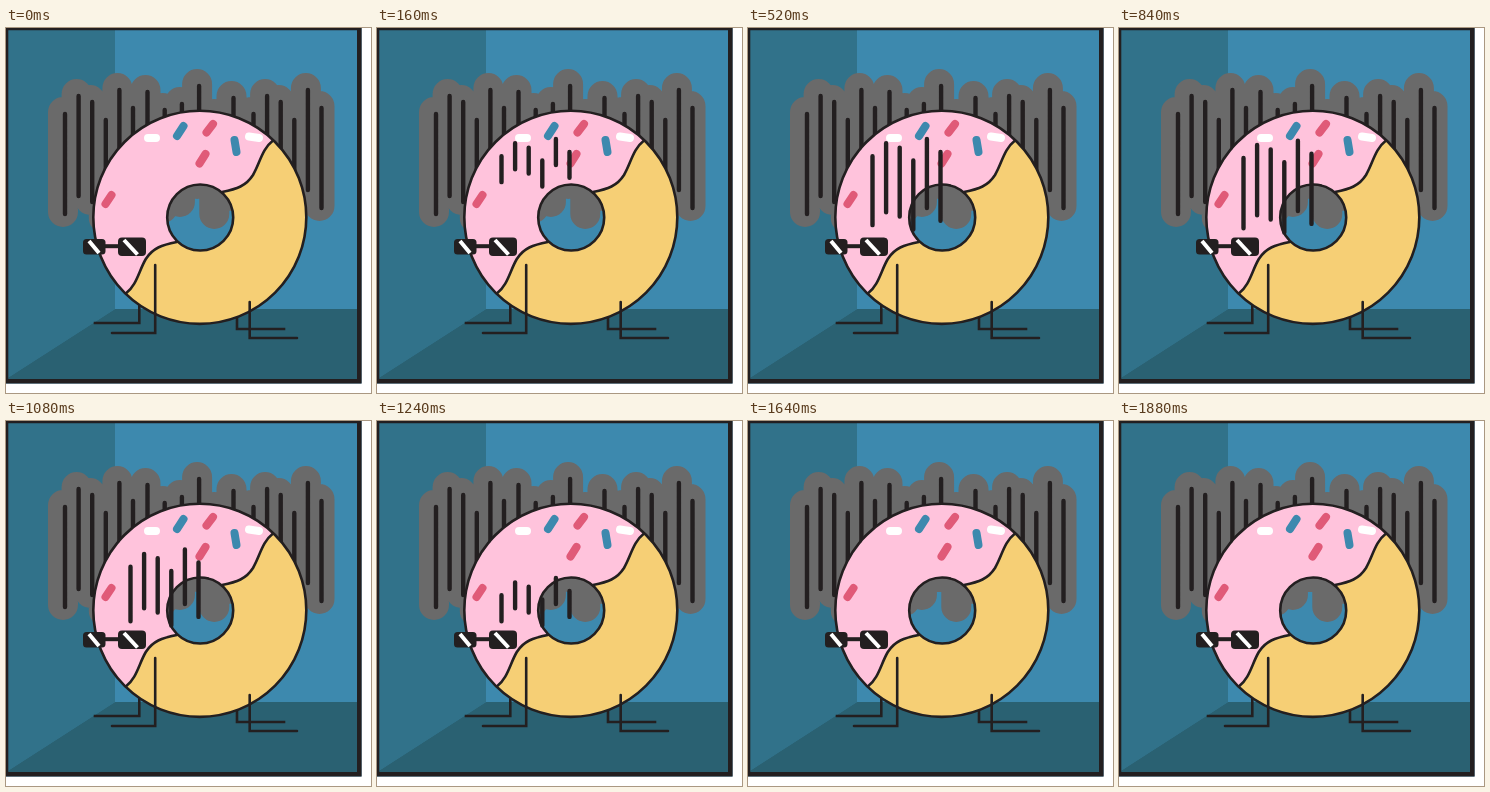
Animation, 365 px wide and 365 px high, one loop 1.92 s. Source, as an HTML page:

```html
<!DOCTYPE html>
<html lang="en">
<head>
<meta charset="utf-8">
<title>Donut</title>
<style>
  html, body { margin: 0; width: 100%; height: 100%; overflow: hidden; background: #fff; }
  svg { display: block; width: 100vw; height: 100vh; }
</style>
</head>
<body>
<svg viewBox="0 0 365 365" fill="none" stroke-linecap="round">
  <defs>
    <path id="ring" clip-rule="evenodd" fill-rule="evenodd"
      d="M87.300 189.300a106.500 106.500 0 1 0 213 0a106.500 106.500 0 1 0-213 0ZM161.200 189.500a33 33 0 1 0 66 0a33 33 0 1 0-66 0Z"/>
    <clipPath id="inRing"><use href="#ring"/></clipPath>
    <path id="seam" d="M216 164C231 161 240 158 247 147C254 135 256 121 267 112.500"/>
  </defs>
  <rect width="355.500" height="355.500" fill="#3d89ae"/>
  <path d="M0 0H109V281L0 351Z" fill="#31728a"/>
  <path d="M109 281H355V355H0V351Z" fill="#2a6172"/>
  <path id="halo" stroke="#6a6a6a" stroke-width="30"/>
  <path id="bars" stroke="#231f20" stroke-width="4.4"/>
  <path d="M133.300 278V295H89M231 288V301H278" stroke="#231f20" stroke-width="2.6" stroke-linecap="square"/>
  <use href="#ring" fill="#f6cf75"/>
  <g clip-path="url(#inRing)">
    <path d="M194 189L216 164C231 161 240 158 247 147C254 135 256 121 267 112.500L220 60H60V300L119.800 265.500C130.800 257 132.800 243 139.800 231C146.800 220 155.800 217 170.800 214Z" fill="#ffc3dc"/>
  </g>
  <g stroke="#231f20" stroke-width="2.6">
    <use href="#ring"/>
    <use href="#seam"/>
    <use href="#seam" transform="rotate(180 193.400 189)"/>
  </g>
  <g stroke-width="8">
    <path stroke="#fff" d="M142 110H150M243 108.500L253 110"/>
    <path stroke="#3d89ae" d="M171 108L177.500 98M228.500 112L230.500 124"/>
    <path stroke="#e05a78" d="M200.500 104.500L207 96M193.500 135.500L199.500 126M99.500 176L105.500 167"/>
  </g>
  <path d="M149.200 237V305H106M243.700 274V310H291" stroke="#231f20" stroke-width="2.6"/>
  <path id="strokes" stroke="#231f20" stroke-width="4.4"/>
  <g fill="#231f20">
    <rect x="77" y="211" width="22.500" height="15.500" rx="3.500"/>
    <rect x="112" y="209.500" width="28" height="18.500" rx="4"/>
    <rect x="97" y="216.200" width="17" height="4"/>
  </g>
  <path d="M83 213L93 225M118 212L131.500 226.500" stroke="#fff" stroke-width="4" stroke-linecap="butt"/>
  <g stroke="#231f20" stroke-linecap="butt">
    <path d="M0 1H355M1 0V355" stroke-width="2.6"/>
    <path d="M353.300 0V353.300H0" stroke-width="4.600"/>
  </g>
</svg>
<script>
const LOOP = 1920, STEP = 40, HALF = 700, LENGTH = 72, BAR = 100;

// Every tuft has six lines whose tops follow the same stagger.
const STAGGER = [4, 1, 2, 5, 0, 3];
const tuft = (x, pitch, top, drop, order = i => i) => STAGGER.map((_, i) =>
  ({ x: x + i * pitch, y: top + drop * STAGGER[order(i)] }));

const sides = [...tuft(59, 13.6, 62, 6), ...tuft(247.5, 13.6, 62, 6)];
const middle = tuft(141.5, 17.2, 58, 6, i => (7 - i) % 6);
const front = tuft(124.5, 13.6, 111, 4.3);

const draw = (id, lines, from, to) => document.getElementById(id).setAttribute("d",
  lines.map(({ x, y }) => `M${x} ${y + from}V${y + to}`).join(""));

// Lines behind the donut stop short of its hole; the halo does not.
const shortened = middle.map(({ x, y }) => ({ x, y: y - BAR / 2 }));
const halo = [...sides, ...middle].map(({ x, y }) => ({ x: x - 2, y }));

draw("halo", halo, -2, BAR - 2);
draw("bars", sides, 0, BAR);
document.getElementById("bars").setAttribute("d",
  document.getElementById("bars").getAttribute("d") +
  shortened.map(({ x, y }) => `M${x} ${y + BAR / 2}V${y + BAR * 0.9}`).join(""));

// Cubic Bezier (0.25, 0.1, 0.25, 1), solved by bisection.
function ease(x) {
  if (x <= 0) return 0;
  if (x >= 1) return 1;
  const curve = (a, b, u) => 3 * a * u * (1 - u) ** 2 + 3 * b * u * u * (1 - u) + u ** 3;
  let low = 0, high = 1;
  for (let i = 0; i < 24; i++) {
    const mid = (low + high) / 2;
    if (curve(0.25, 0.25, mid) < x) low = mid; else high = mid;
  }
  return curve(0.1, 1, low);
}

function render(now) {
  const t = Math.floor((now % LOOP) / STEP) * STEP;
  const end = ease(t / HALF);
  const start = t < HALF ? 0 : 1 - ease((2 * HALF - t) / HALF);
  const visible = end - start > 0.001 ? front : [];
  draw("strokes", visible, start * LENGTH, end * LENGTH);
}

const origin = performance.now();
function tick() {
  render(performance.now() - origin);
  requestAnimationFrame(tick);
}
tick();
</script>
</body>
</html>
```
